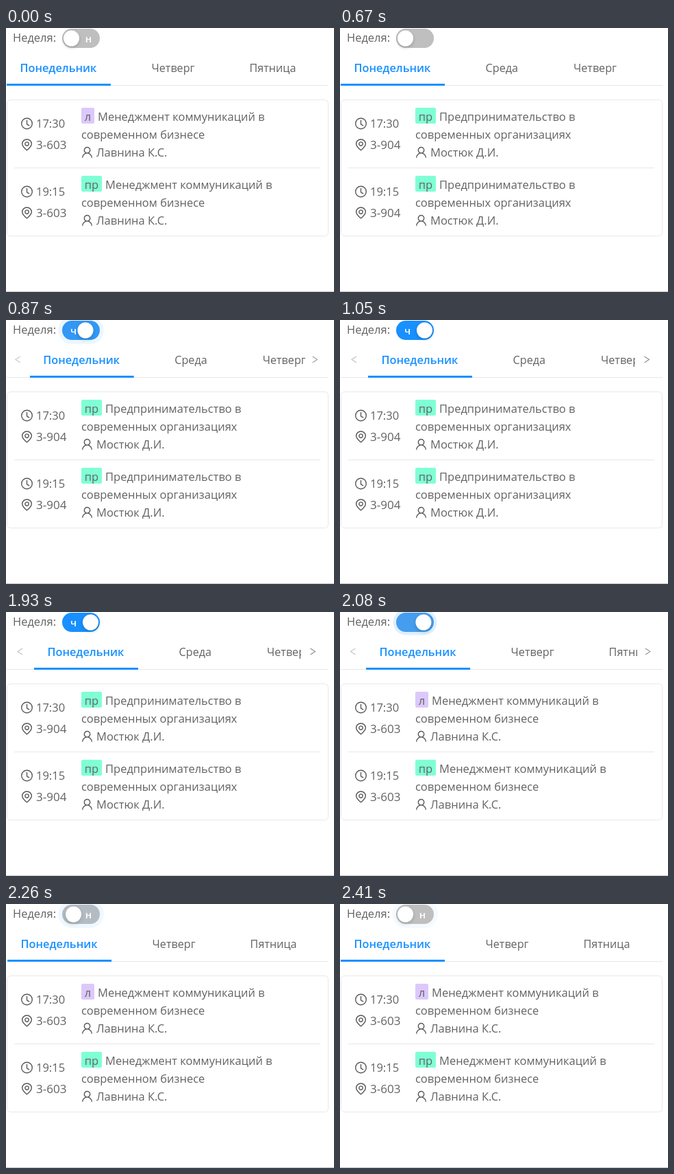
Write an HTML page with a canvas that moves like this. It is 479 by 384 pixels and loops after 2540 ms.

```html
<!DOCTYPE html>
<html lang="ru">
<head>
<meta charset="utf-8">
<style>
  html, body { margin: 0; height: 100%; overflow: hidden; background: #fff; }
  canvas { display: block; }
</style>
</head>
<body>
<canvas id="stage" width="479" height="384"></canvas>
<script>
const ctx = document.getElementById('stage').getContext('2d');
const LOOP = 2540, TURN_ON = 670, TURN_OFF = 2008, LAG = 4;
const BLUE = '#1890ff', TEXT = '#626262', LINE = '#e8e8e8';
const FONT = '"Open Sans", "Noto Sans", sans-serif';

const weeks = {
  odd: {
    tabs: [['Четверг', 212.5], ['Пятница', 355.5]],
    room: '3-603', teacher: 'Лавнина К.С.',
    subject: ['Менеджмент коммуникаций в', 'современном бизнесе'],
    kinds: ['л', 'пр']
  },
  even: {
    tabs: [['Среда', 212.5], ['Четверг', 341]],
    room: '3-904', teacher: 'Мостюк Д.И.',
    subject: ['Предпринимательство в', 'современных организациях'],
    kinds: ['пр', 'пр']
  }
};
const tags = { 'л': { width: 19, color: '#dcc8fb' }, 'пр': { width: 30, color: '#7fffd4' } };

// CSS-style cubic-bezier timing function
function bezier(x1, y1, x2, y2) {
  const at = (a, b, s) => 3 * s * (1 - s) ** 2 * a + 3 * s * s * (1 - s) * b + s ** 3;
  return x => {
    if (x <= 0) return 0;
    if (x >= 1) return 1;
    let lo = 0, hi = 1;
    for (let i = 0; i < 24; i++) {
      const mid = (lo + hi) / 2;
      if (at(x1, x2, mid) < x) lo = mid; else hi = mid;
    }
    return at(y1, y2, lo);
  };
}
const ease = bezier(.25, .1, .25, 1);
const knobEase = bezier(.78, .14, .15, .86);
const tabEase = bezier(.645, .045, .355, 1);
const waveEase = bezier(.08, .82, .17, 1);

function text(str, x, y, { color = TEXT, size = 16.5, weight = 400, align = 'left' } = {}) {
  ctx.font = `${weight} ${size}px ${FONT}`;
  ctx.fillStyle = color;
  ctx.textAlign = align;
  ctx.fillText(str, x, y);
}

function rect(x, y, w, h, color) {
  ctx.fillStyle = color;
  ctx.fillRect(x, y, w, h);
}

function rounded(x, y, w, h, r, color) {
  ctx.beginPath();
  ctx.roundRect(x, y, w, h, r);
  ctx.fillStyle = color;
  ctx.fill();
}

function icon(path, x, y) {
  ctx.save();
  ctx.translate(x, y);
  ctx.strokeStyle = '#595959';
  ctx.lineWidth = 1.4;
  ctx.stroke(new Path2D(path));
  ctx.restore();
}
const CLOCK = 'M-7.8 0a7.8 7.8 0 1 0 15.6 0a7.8 7.8 0 1 0-15.6 0M0-5V.8L3.6 3.2';
const PIN = 'M0 7.8C-4 4.5-6.8 1.5-6.8-1.6a6.8 6.4 0 0 1 13.6 0C6.8 1.5 4 4.5 0 7.8Z' +
  'M-2.7-1.4a2.7 2.7 0 1 0 5.4 0a2.7 2.7 0 1 0-5.4 0';
const USER = 'M-4.2-3.3a4.2 4.2 0 1 0 8.4 0a4.2 4.2 0 1 0-8.4 0M-6.8 7.8a6.8 6.9 0 0 1 13.6 0';

function drawSwitch(on, elapsed, glowing) {
  const progress = fn => on ? fn(elapsed / 360) : 1 - fn(elapsed / 360);
  const mix = progress(ease);
  const knobX = 95.5 + 28 * progress(knobEase);
  if (glowing) {
    const spread = 6 * waveEase(elapsed / 400);
    const alpha = .2 * (1 - waveEase(elapsed / 2000));
    rounded(82 - spread, 1 - spread, 55 + 2 * spread, 28 + 2 * spread, 14 + spread,
      `rgba(24,144,255,${alpha})`);
  }
  const channel = (a, b) => a + (b - a) * mix;
  rounded(82, 1, 55, 28, 14, `rgb(${channel(191, 24)},${channel(191, 144)},${channel(191, 255)})`);
  text(on ? 'ч' : 'н', on ? 98.5 : 120.5, 20.5, { color: '#fff', size: 14.5, weight: 600, align: 'center' });
  ctx.save();
  ctx.shadowColor = 'rgba(0,35,11,.2)';
  ctx.shadowBlur = 5;
  ctx.shadowOffsetY = 2;
  rounded(knobX - 11.5, 3.5, 23, 23, 11.5, '#fff');
  ctx.restore();
}

function arrow(x, dir, color) {
  ctx.beginPath();
  ctx.moveTo(x - 3.5 * dir, 53);
  ctx.lineTo(x + 3.5 * dir, 57.5);
  ctx.lineTo(x - 3.5 * dir, 62);
  ctx.strokeStyle = color;
  ctx.lineWidth = 1.1;
  ctx.stroke();
}

function drawTabs(week, open) {
  const shift = 40 * open;
  rect(1, 83, 470, 1, LINE);
  ctx.save();
  ctx.beginPath();
  ctx.rect(1 + shift, 40, 470 - 2 * shift, 46);
  ctx.clip();
  ctx.translate(shift, 0);
  text('Понедельник', 20.5, 64, { color: BLUE, size: 16.3, weight: 600 });
  for (const [name, x] of week.tabs) text(name, x, 64, { size: 16.2 });
  rect(1, 81, 152, 3, BLUE);
  ctx.restore();
  ctx.globalAlpha = open;
  arrow(20.5 * open, -1, '#bfbfbf');
  arrow(468 - 20 * open, 1, '#8c8c8c');
  ctx.globalAlpha = 1;
}

function drawLesson(week, time, kind, y) {
  const tag = tags[kind];
  icon(CLOCK, 30.5, y + 35);
  text(time, 44, y + 41);
  icon(PIN, 30.5, y + 66);
  text(week.room, 44, y + 72, { size: 17 });
  rounded(110, y + 12, tag.width, 23, 2, tag.color);
  text(kind, 110 + tag.width / 2, y + 31, { align: 'center' });
  text(week.subject[0], 115 + tag.width, y + 31);
  text(week.subject[1], 110, y + 57);
  icon(USER, 118.5, y + 77);
  text(week.teacher, 132, y + 83);
}

function draw(t) {
  const on = t >= TURN_ON && t < TURN_OFF;
  const sinceClick = on ? t - TURN_ON : t >= TURN_OFF ? t - TURN_OFF : LOOP;
  const elapsed = Math.max(0, sinceClick - LAG);
  const glowing = t >= TURN_OFF || on && sinceClick < 380;
  const week = on ? weeks.even : weeks.odd;
  const slide = tabEase(elapsed / 300);

  rect(0, 0, 479, 384, '#fff');
  text('Неделя:', 10, 20);
  drawSwitch(on, elapsed, glowing);
  drawTabs(week, on ? slide : 1 - slide);

  ctx.beginPath();
  ctx.roundRect(1.5, 104.5, 469, 198, 5);
  ctx.strokeStyle = LINE;
  ctx.lineWidth = 1;
  ctx.stroke();
  drawLesson(week, '17:30', week.kinds[0], 104);
  rect(12, 203, 447, 1, LINE);
  drawLesson(week, '19:15', week.kinds[1], 203);
  rect(0, 383, 479, 1, '#c4c4c4');
}

function tick() {
  draw(performance.now() % LOOP);
  requestAnimationFrame(tick);
}
tick();
</script>
</body>
</html>
```
